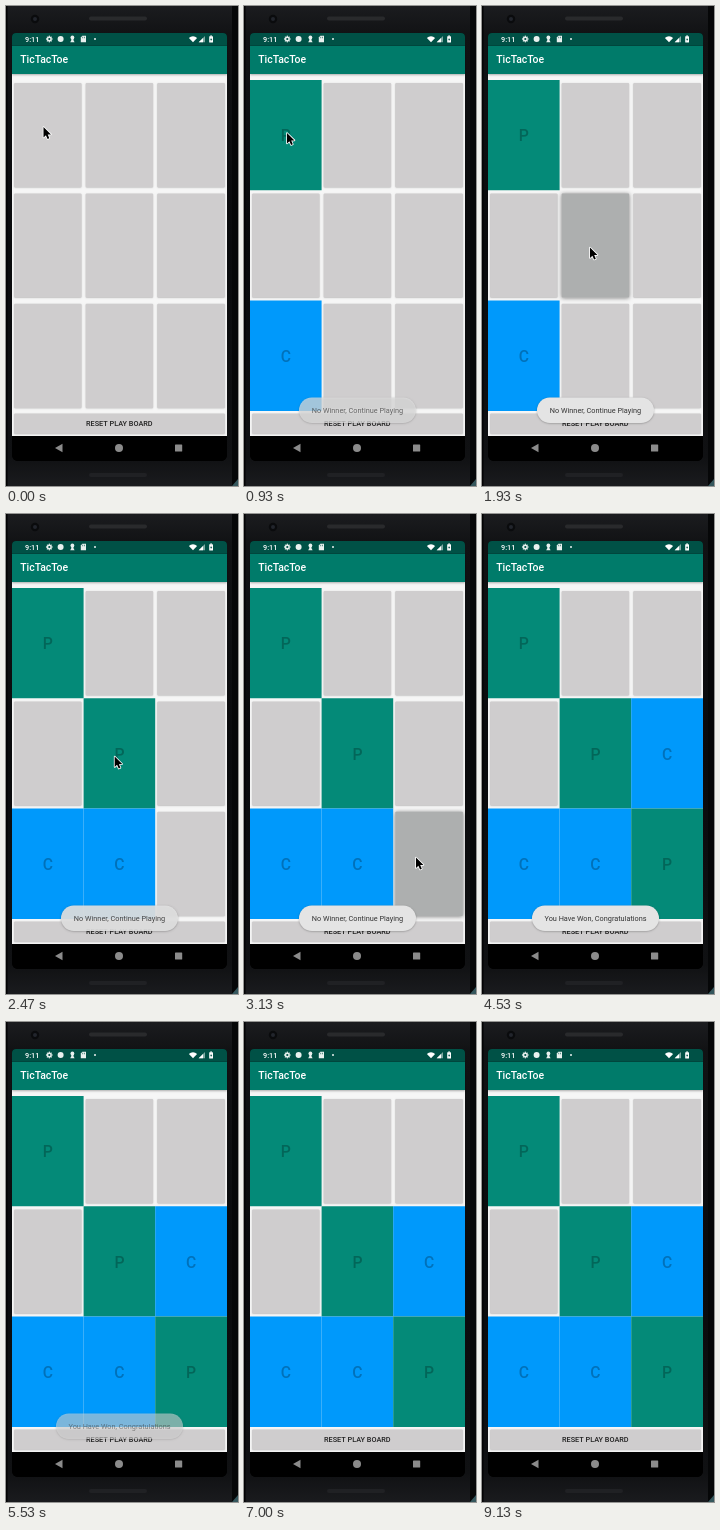
Write an HTML page with a canvas that moves like this. It is 232x480 px and loops after 9390 ms.

```html
<!DOCTYPE html>
<html lang="en">
<head>
<meta charset="utf-8">
<title>TicTacToe</title>
<style>
  html, body { margin: 0; width: 100%; height: 100%; overflow: hidden; background: #0b0c0e; }
  canvas { display: block; width: 232px; height: 480px; }
</style>
</head>
<body>
<canvas id="stage"></canvas>
<script>
const W = 232, H = 480, LOOP = 9390;
const canvas = document.getElementById('stage');
const ratio = window.devicePixelRatio || 1;
canvas.width = W * ratio;
canvas.height = H * ratio;
const ctx = canvas.getContext('2d');
ctx.scale(ratio, ratio);

const GREY = '#cfcdce', PRESSED = '#adafaf', GREEN = '#048a78', BLUE = '#0099fb';
const COLS = [6, 77.6, 149.2, 221], ROWS = [74, 184.3, 294.6, 405];

// Time at which each cell is taken, and by whom.
const moves = [
  { cell: 0, mark: 'P', at: 660 }, { cell: 6, mark: 'C', at: 660 },
  { cell: 4, mark: 'P', at: 2060 }, { cell: 7, mark: 'C', at: 2060 },
  { cell: 8, mark: 'P', at: 3195 }, { cell: 5, mark: 'C', at: 3195 }
];
const presses = [
  { cell: 0, x: 37, y: 120.5, from: 265, grow: 465, to: 660 },
  { cell: 4, x: 108, y: 241, from: 1865, grow: 1865, to: 2060 },
  { cell: 8, x: 172, y: 344, from: 2930, grow: 2930, to: 3195 }
];
const toasts = [
  { text: 'No Winner, Continue Playing', x: 55, w: 117, from: 700, to: 2060 },
  { text: 'No Winner, Continue Playing', x: 55, w: 117, from: 2130, to: 3195 },
  { text: 'You Have Won, Congratulations', x: 50, w: 127, from: 3265, to: 5240 }
];
// Pointer stops: time, x, y
const path = [
  [0, 37.5, 121], [600, 37.5, 121], [800, 43, 127], [1430, 43, 127],
  [1730, 108, 241.5], [2450, 108, 241.5], [2800, 172, 343.5],
  [3260, 172, 343.5], [3800, 158, 414], [4500, 158, 414]
];

const clamp = v => Math.max(0, Math.min(1, v));
const smooth = v => v * v * (3 - 2 * v);

function rect(x, y, w, h, color, r = 0) {
  ctx.fillStyle = color;
  ctx.beginPath();
  ctx.roundRect(x, y, w, h, r);
  ctx.fill();
}

function disc(x, y, r, color) {
  ctx.fillStyle = color;
  ctx.beginPath();
  ctx.arc(x, y, r, 0, Math.PI * 2);
  ctx.fill();
}

function poly(points, color) {
  ctx.fillStyle = color;
  ctx.beginPath();
  points.forEach(([x, y]) => ctx.lineTo(x, y));
  ctx.closePath();
  ctx.fill();
}

function label(text, x, y, size, color, weight = 400, align = 'left') {
  ctx.font = `${weight} ${size}px Roboto, sans-serif`;
  ctx.textAlign = align;
  ctx.fillStyle = color;
  ctx.fillText(text, x, y);
}

function shadow(color, blur, dy, draw) {
  ctx.save();
  ctx.shadowColor = color;
  ctx.shadowBlur = blur * ratio;
  ctx.shadowOffsetY = dy * ratio;
  draw();
  ctx.restore();
}

function drawPhone() {
  const shade = ctx.createLinearGradient(0, 0, 0, H);
  shade.addColorStop(0, '#1b1c1f');
  shade.addColorStop(0.06, '#111214');
  shade.addColorStop(0.5, '#090a0c');
  shade.addColorStop(0.94, '#101113');
  shade.addColorStop(1, '#1a1b1e');
  ctx.fillStyle = shade;
  ctx.fillRect(0, 0, W, H);
  rect(0, 0, 1.5, H, '#030304');
  rect(226, 0, 6, H, '#060708');
  poly([[232, 473], [232, 480], [226, 480]], '#35575d');
  disc(29, 13, 4.2, '#0a0b0d');
  disc(29, 13, 2, '#22252c');
  rect(83, 10.5, 58, 4, '#292a2c', 2);
  rect(83, 467, 58, 4, '#202124', 2);
  rect(6, 27, 215, 428, '#000', [4, 4, 6, 6]);
}

function drawStatusBar() {
  rect(6, 27, 215, 12.5, '#005146', [4, 4, 0, 0]);
  label('9:11', 19, 35.6, 7.3, '#fff', 500);
  disc(43.3, 33, 2.5, '#e9f1ef');
  for (let i = 0; i < 8; i++) {
    const a = i * Math.PI / 4;
    disc(43.3 + Math.cos(a) * 2.7, 33 + Math.sin(a) * 2.7, 0.7, '#e9f1ef');
  }
  disc(43.3, 33, 1.1, '#005146');
  disc(54.6, 33, 3, '#e9f1ef');
  disc(66.4, 31.4, 1.9, '#e9f1ef');
  poly([[65, 32], [67.8, 32], [67.4, 34], [68.6, 36.3], [64.2, 36.3], [65.4, 34]], '#e9f1ef');
  poly([[76.3, 29.8], [80, 29.8], [80, 36.3], [74.8, 36.3], [74.8, 31.4]], '#e9f1ef');
  rect(76.5, 30.8, 0.6, 1.5, '#005146');
  rect(78, 30.8, 0.6, 1.5, '#005146');
  disc(89, 33, 1, '#e9f1ef');

  ctx.fillStyle = '#fff';
  ctx.beginPath();
  ctx.moveTo(187, 36.3);
  ctx.arc(187, 36.3, 6, -Math.PI * 0.74, -Math.PI * 0.26);
  ctx.fill();
  poly([[199, 30], [199, 36.3], [192.7, 36.3]], '#7fa9a2');
  poly([[197, 32], [197, 36.3], [192.7, 36.3]], '#fff');
  rect(203.2, 30.3, 3.8, 6.3, '#fff', 0.5);
  rect(204.2, 29.4, 1.8, 1.2, '#fff');
  poly([[205.5, 31.4], [204, 33.8], [205, 33.8], [204.7, 35.5], [206.2, 33], [205.2, 33]], '#005146');
}

function drawNavBar() {
  rect(6, 430, 215, 25, '#000', [0, 0, 6, 6]);
  poly([[49, 442], [56.5, 437.8], [56.5, 446.2]], '#8b8b8b');
  disc(113, 442, 4, '#8b8b8b');
  rect(169, 438.4, 7.2, 7.2, '#8b8b8b', 0.6);
}

function greyButton(x, y, w, h, lifted) {
  shadow(`rgba(0,0,0,${lifted ? 0.5 : 0.22})`, lifted ? 4 : 1.5, 0.5,
    () => rect(x, y, w, h, GREY, 1));
}

function drawCell(index, t) {
  const col = index % 3, row = Math.floor(index / 3);
  const x = COLS[col], y = ROWS[row], w = COLS[col + 1] - x, h = ROWS[row + 1] - y;
  const taken = moves.find(m => m.cell === index && t >= m.at);
  if (taken) {
    rect(x, y, w, h, taken.mark === 'P' ? GREEN : BLUE);
    label(taken.mark, x + w / 2, y + 61.2, 15.7, 'rgba(0,0,0,.26)', 500, 'center');
    return;
  }
  const press = presses.find(p => p.cell === index && t >= p.from && t < p.to);
  const bx = x + 2.1, by = y + 3.1, bw = w - 4.2, bh = h - 6.2;
  greyButton(bx, by, bw, bh, press && t >= press.grow);
  if (press) {
    ctx.save();
    ctx.beginPath();
    ctx.roundRect(bx, by, bw, bh, 1);
    ctx.clip();
    disc(press.x, press.y, 18 + 110 * clamp((t - press.grow) / 60), PRESSED);
    ctx.restore();
  }
}

function drawApp(t) {
  rect(6, 68, 215, 362, '#f6f6f6');
  shadow('rgba(0,0,0,.3)', 2, 0.7, () => rect(6, 39.5, 215, 28.5, '#007b6a'));
  label('TicTacToe', 14.2, 57.3, 10.46, '#fff', 500);
  // Free cells first, so taken ones cover their shadows.
  const taken = i => moves.some(m => m.cell === i && t >= m.at);
  [...Array(9).keys()].sort((a, b) => taken(a) - taken(b)).forEach(i => drawCell(i, t));
  greyButton(8.1, 407.6, 210.8, 20.2, false);
  label('RESET PLAY BOARD', 113.3, 420.2, 7.32, '#222', 500, 'center');
}

function drawToast({ text, x, w, from, to }, t) {
  const fadeIn = 1 - (1 - clamp((t - from) / 500)) ** 2;
  const fadeOut = 1 - clamp((t - to) / 430) ** 2;
  const alpha = t < from ? 0 : fadeIn * fadeOut;
  if (alpha <= 0) return;
  ctx.save();
  ctx.globalAlpha = alpha;
  shadow('rgba(0,0,0,.3)', 2, 0.6, () => rect(x, 391.4, w, 25.6, '#e4e4e4', 12.8));
  label(text, x + w / 2, 407, 7.32, '#333', 400, 'center');
  ctx.restore();
}

function drawPointer(t) {
  const next = path.findIndex(p => p[0] > t);
  if (next < 1) return;
  const [t0, x0, y0] = path[next - 1], [t1, x1, y1] = path[next];
  const k = smooth((t - t0) / (t1 - t0));
  ctx.save();
  ctx.translate(x0 + (x1 - x0) * k, y0 + (y1 - y0) * k);
  ctx.beginPath();
  [[0, 0], [0, 10.5], [2.4, 8.3], [4.1, 12], [5.8, 11.2], [4.2, 7.6], [7.5, 7.4]]
    .forEach(([x, y]) => ctx.lineTo(x, y));
  ctx.closePath();
  ctx.fillStyle = '#000';
  ctx.strokeStyle = '#fff';
  ctx.lineWidth = 1.6;
  ctx.lineJoin = 'round';
  ctx.stroke();
  ctx.fill();
  ctx.restore();
}

function draw(t) {
  drawPhone();
  drawApp(t);
  drawStatusBar();
  drawNavBar();
  toasts.forEach(toast => drawToast(toast, t));
  drawPointer(t);
}

const start = performance.now();
function tick() {
  draw((performance.now() - start) % LOOP);
  requestAnimationFrame(tick);
}
tick();
</script>
</body>
</html>
```
